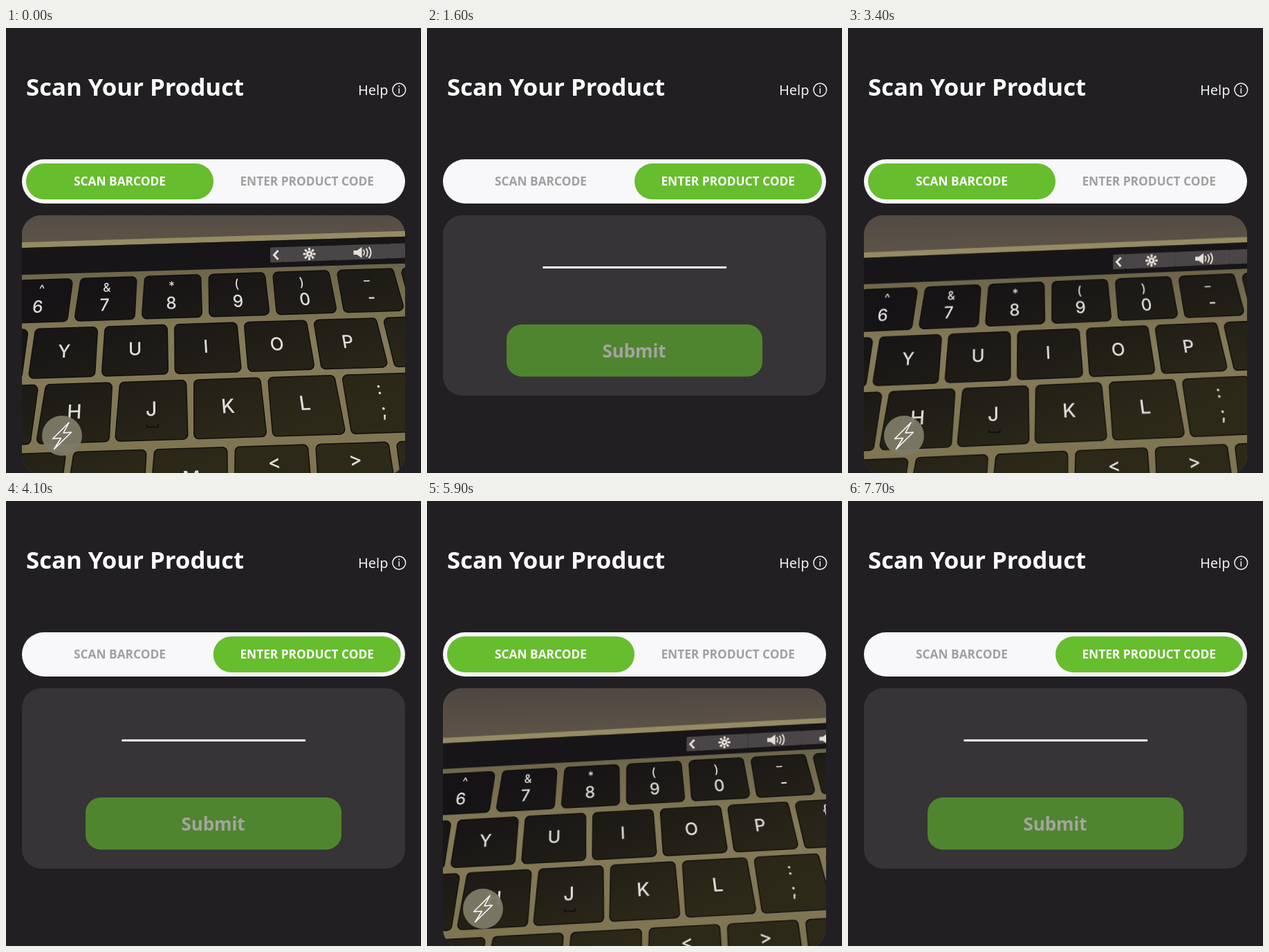
Recreate the animation shown at these times as an HTML page. Size 600 by 644 pixels, loop 7.8 s.

```html
<!DOCTYPE html>
<html lang="en">
<head>
<meta charset="utf-8">
<title>Scan Your Product</title>
<style>
  html, body { margin: 0; width: 100%; height: 100%; overflow: hidden; background: #211f22; }
  svg { display: block; width: 100%; height: 100%; font-family: "Noto Sans", "Open Sans", sans-serif; }
  .bold { font-weight: 700; }
  .mid { text-anchor: middle; }
  #keys { filter: blur(.55px); }
  #keys text {
    font-family: Inter, "Liberation Sans", sans-serif; font-weight: 500;
    fill: #dfdcdc; text-anchor: middle; dominant-baseline: central;
  }
</style>
</head>
<body>
<svg viewBox="0 0 600 644">
  <defs>
    <clipPath id="frame"><rect x="23" y="271" width="554" height="376" rx="28"/></clipPath>
    <linearGradient id="lid" gradientUnits="userSpaceOnUse" x1="0" y1="240" x2="0" y2="315">
      <stop offset="0" stop-color="#4f4740"/><stop offset="1" stop-color="#5e5449"/>
    </linearGradient>
    <linearGradient id="metal" gradientUnits="userSpaceOnUse" x1="0" y1="340" x2="0" y2="660">
      <stop offset="0" stop-color="#6c6449"/><stop offset=".35" stop-color="#857b58"/><stop offset="1" stop-color="#7d7351"/>
    </linearGradient>
    <linearGradient id="cap" gradientUnits="userSpaceOnUse" x1="200" y1="350" x2="300" y2="620">
      <stop offset="0" stop-color="#151315"/><stop offset=".5" stop-color="#201d17"/><stop offset="1" stop-color="#2d2919"/>
    </linearGradient>
  </defs>

  <rect width="600" height="644" fill="#211f22"/>
  <text class="bold" x="29" y="98" font-size="34.75" fill="#fff">Scan Your Product</text>
  <text x="509" y="97" font-size="20" fill="#f2f1f3">Help</text>
  <g fill="none" stroke="#f2f1f3" stroke-width="1.5">
    <circle cx="568.3" cy="89.5" r="9.4"/>
    <path d="M568.3 87.3V94.8M568.3 83.6V85.4"/>
  </g>

  <rect x="23" y="190" width="554" height="64" rx="32" fill="#f8f7fa"/>
  <rect id="pill" y="196" width="271" height="52" rx="26" fill="#66bd2d"/>
  <text id="scanLabel" class="bold mid" x="164.5" y="228.3" font-size="17.3">SCAN BARCODE</text>
  <text id="codeLabel" class="bold mid" x="435.2" y="228.3" font-size="17.3">ENTER PRODUCT CODE</text>

  <g id="codePanel">
    <rect x="23" y="271" width="554" height="261" rx="28" fill="#363437"/>
    <rect x="167.5" y="345" width="265.5" height="3" fill="#fff"/>
    <rect x="115" y="429" width="370" height="75.5" rx="22" fill="#50852f"/>
    <text class="bold mid" x="299.5" y="477" font-size="25.9" fill="#a3a5a1">Submit</text>
  </g>

  <g id="camera" clip-path="url(#frame)">
    <rect x="23" y="271" width="554" height="379" fill="#57504a"/>
    <g id="keys"></g>
    <circle cx="81" cy="590" r="29" fill="#7f7b69" fill-opacity=".94"/>
    <path d="M91 571L67.5 594.5L79.5 593.5L69.5 609.5L94.5 585L83 586Z" fill="none" stroke="#fff" stroke-width="1.5" stroke-linejoin="round"/>
  </g>
</svg>
<script>
const LOOP = 7800;
const $ = id => document.getElementById(id);
const clamp = v => Math.max(0, Math.min(1, v));
const mix = (a, b, k) => a + (b - a) * k;

// The keyboard seen by the camera
const poly = (points, fill, round = 0) =>
  `<polygon points="${points}" fill="${fill}" stroke="${fill}" stroke-width="${round}" stroke-linejoin="round"/>`;
const tilt = (x, y) => y - .032 * (x - 300);
// Legends lean towards the vanishing point
const glyph = (s, x, y, size) =>
  `<text transform="translate(${x} ${y}) rotate(-1.8) skewX(${(x - 240) * .033})" font-size="${size}">${s}</text>`;
// A band across the whole picture, given by its heights at x = 300
const band = (top, bottom, fill) => {
  const edge = (x, y) => [x, y - .03 * (x - 300)];
  return poly([edge(-200, top), edge(800, top), edge(800, bottom), edge(-200, bottom)], fill);
};

function keyCap(topX, topW, topY, lowX, lowW, lowY) {
  const quad = inset => [[topX - topW / 2 + inset, topY + inset], [topX + topW / 2 - inset, topY + inset],
    [lowX + lowW / 2 - inset, lowY - inset], [lowX - lowW / 2 + inset, lowY - inset]]
    .map(([x, y]) => [x, tilt(x, y)]);
  return poly(quad(8), '#100e0d', 15) + poly(quad(8.5), 'url(#cap)', 13);
}

function keyboard() {
  let s = band(150, 303, 'url(#lid)') + band(302, 310, '#958b64')
    + band(310, 900, 'url(#metal)') + band(310, 349, '#171517');

  // touch strip
  const strip = (a, b) => poly([[a, 319 - (a - 383) * .03], [b, 319 - (b - 383) * .03],
    [b, 338 - (b - 383) * .035], [a, 338 - (a - 383) * .035]], '#4a4647', 3);
  s += '<g transform="translate(-1.5 0)">' + strip(385, 400) + strip(403, 474) + strip(477, 553) + strip(556, 640);
  s += '<g fill="none" stroke="#e6e1da" stroke-width="3"><path d="M395 322L389 328.500L395 335"/>';
  for (let i = 0; i < 8; i++)
    s += `<path d="M440 322V318" transform="rotate(${i * 45} 440 327)"/>`;
  s += '<circle cx="440" cy="327" r="3"/>';
  s += '<path d="M518 321A6 6 0 0 1 518 329M522 319A9 9 0 0 1 522 331M526 317A12 12 0 0 1 526 333" stroke-width="1.9"/></g>';
  const speaker = x => `<path d="M${x} 322h5l7 -5v16l-7 -5h-5z" fill="#e6e1da"/>`;
  s += speaker(504) + speaker(582) + '</g>';

  // first centre, pitch, width and y for the upper and the lower edge of each row
  const rows = [
    [55, 93, 84, 355, 46, 97, 89, 419],
    [87, 101, 93, 426, 81, 105.5, 98, 500],
    [105, 107.5, 99, 507, 97, 113.5, 107, 595],
    [150, 117, 108, 606, 141, 123, 116, 705]
  ];
  for (const [tx, tp, tw, ty, bx, bp, bw, by] of rows)
    for (let i = -2; i < 7; i++)
      s += keyCap(tx + tp * i, tw, ty, bx + bp * i, bw, by);

  const legends = (chars, x, dx, y, dy, size) =>
    [...chars].forEach((c, i) => s += glyph(c, x + dx * i, y + dy * i, size));
  legends('67890-', 46, 96.5, 403, -2.75, 24.5);
  legends('^&*()–', 52, 93.8, 377.5, -2.5, 17.5);
  legends('YUIOP', 84, 102.5, 467.5, -3.5, 26);
  legends('HJKL', 99, 111, 555, -4.2, 28.5);
  s += glyph(':', 539, 521, 25) + glyph(';', 546, 553, 26) + glyph('{', 591, 433, 21);
  s += glyph('M', 268, 651, 28) + glyph('&lt;', 388, 628, 28) + glyph('&gt;', 505, 624, 28);
  s += '<path d="M204 574v3.500h16v-4" fill="none" stroke="#0d0c0a" stroke-width="1.6"/>';
  return s;
}
$('keys').innerHTML = keyboard();

// Hand-held camera: time, matrix a b c d, place of the "6" key
const poses = [
  [0, 1, 0, 0, 1, 46, 403],
  [2800, .9924, -.0076, -.0117, .9883, 50.5, 411],
  [5200, .9712, -.0202, -.0216, .962, 50, 428.5],
  [6600, .9635, -.0253, -.0129, .9474, 48, 433]
];
function cameraMatrix(t) {
  let i = 0;
  while (i < poses.length - 2 && t > poses[i + 1][0]) i++;
  const [from, to] = [poses[i], poses[i + 1]];
  const k = clamp((t - from[0]) / (to[0] - from[0]));
  const [, a, b, c, d, x, y] = from.map((v, n) => mix(v, to[n], k));
  return `matrix(${[a, b, c, d, x - a * 46 - c * 403, y - b * 46 - d * 403]})`;
}

// The tabs alternate at these times, starting on the camera
const taps = [870, 1885, 3580, 4485, 6970];
function spring(t) {
  if (t > .718) return 1;
  const w = 4.83, decay = 6.93;
  return 1 - Math.exp(-decay * t) * (Math.cos(w * t) + decay / w * Math.sin(w * t));
}

function draw(t) {
  const count = taps.filter(tap => tap <= t).length;
  const since = count ? t - taps[count - 1] : LOOP;
  const side = k => count % 2 ? k : 1 - k;
  const slide = side(spring(since / 1000));
  const fade = side(clamp(since / 350));
  const label = k => { const v = Math.round(mix(160, 255, clamp(k))); return `rgb(${v},${v},${v})`; };

  $('pill').setAttribute('x', 29 + 271 * slide);
  $('scanLabel').setAttribute('fill', label(1 - slide));
  $('codeLabel').setAttribute('fill', label(slide));
  $('codePanel').setAttribute('opacity', fade);
  $('camera').setAttribute('opacity', 1 - fade);
  $('keys').setAttribute('transform', cameraMatrix(t));
}

const start = performance.now();
function tick() {
  const t = (performance.now() - start) % LOOP;
  draw(Math.floor(t / 100) * 100);
  requestAnimationFrame(tick);
}
tick();
</script>
</body>
</html>
```
